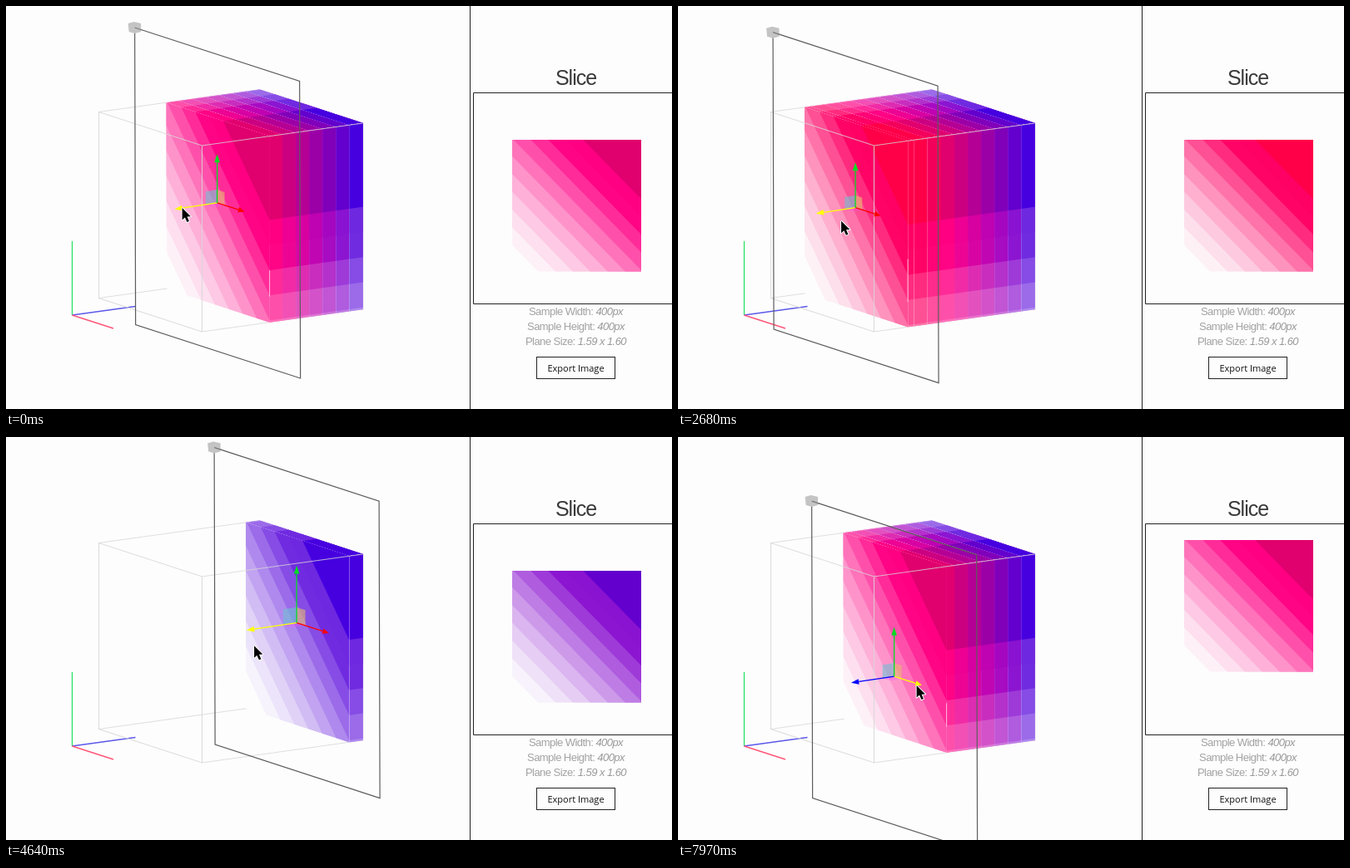
These frames come from a looping animation (800x485 px, 8 s). An HTML page with a canvas:

```html
<!DOCTYPE html>
<html lang="en">
<head>
<meta charset="utf-8">
<title>Slice</title>
<style>
html, body { margin: 0; width: 100%; height: 100%; overflow: hidden; background: #fdfdfd; }
canvas { display: block; position: absolute; left: 0; top: 0; }
.panel { position: absolute; left: 570px; width: 229px; text-align: center;
  font-family: "Liberation Sans", Arial, sans-serif; white-space: nowrap; }
h1 { margin: 0; top: 71px; font-size: 25px; font-weight: 400; line-height: 30px; letter-spacing: -1px; color: #3a3a3a; }
.info { top: 359px; font-size: 13px; line-height: 18px; letter-spacing: -.55px; color: #a2a2a2; }
.info i { color: #999; }
.button { position: absolute; left: 637px; top: 422px; width: 93px; height: 25px; border: 1px solid #222;
  font: 11px/25px "Open Sans", "Noto Sans", sans-serif; color: #111; text-align: center; white-space: nowrap; }
</style>
</head>
<body>
<canvas id="stage" width="800" height="485"></canvas>
<h1 class="panel">Slice</h1>
<div class="panel info">
  <div>Sample Width: <i>400px</i></div>
  <div>Sample Height: <i>400px</i></div>
  <div>Plane Size: <i>1.59 x 1.60</i></div>
</div>
<div class="button">Export Image</div>
<script>
const ctx = document.getElementById('stage').getContext('2d');
const LOOP = 8000, STEP = 85, LEVELS = 12;
const PAPER = '#fdfdfd', INK = '#222';

// Plane depth in the cube, its vertical drop, and the pointer relative to its centre
const REST = { depth: .42, drop: 0, grab: [-43, 6] };
// Each drag lists only what it changes; swing bends the depth on the way
const DRAGS = [
  { from: 630, to: 1420, depth: .202, grab: [-60, 27] },
  { from: 1540, to: 1830, depth: -.01 },
  { from: 1970, to: 2680, depth: .21, swing: -.2, grab: [-18, 16] },
  { from: 2800, to: 3560, depth: .86, swing: .14, grab: [-37, 22] },
  { from: 3680, to: 4430, depth: 1.03, swing: .03, grab: [-53, 27] },
  { from: 4490, to: 5260, depth: .451, grab: [-48, 30] },
  { from: 5410, to: 5580, grab: [0, -45] },
  { from: 5940, to: 6710, drop: -65 },
  { from: 6830, to: 7560, drop: 52, grab: [10, 19] },
  { from: 7670, to: 7970, grab: [26, 11] }
];

// Cube edges on screen
const U = [124, 40.5], W = [193.2, -27], V = [0, 224];
const A = [111.5, 127.5];

const add = (p, v, k = 1) => [p[0] + v[0] * k, p[1] + v[1] * k];
const mix = (a, b, k) => a + (b - a) * k;
const clamp = v => Math.min(1, Math.max(0, v));

function pose(t) {
  let now = { ...REST };
  for (const drag of DRAGS) {
    if (t < drag.from) break;
    const next = { ...now, ...drag };
    const steps = Math.round((drag.to - drag.from) / STEP);
    const done = Math.floor((t - drag.from) / (drag.to - drag.from) * steps + .001);
    const k = clamp((done + 1) / (steps + 1));
    now = {
      depth: mix(now.depth, next.depth, k) + (drag.swing || 0) * Math.sin(Math.PI * k),
      drop: mix(now.drop, next.drop, k),
      grab: now.grab.map((v, i) => mix(v, next.grab[i], k))
    };
  }
  return now;
}

function hovered(t) {
  if (t < 5450) return 'blue';
  if (t < 7480) return t < 5550 ? '' : 'green';
  return t < 7740 ? '' : 'red';
}

// Red runs through magenta to blue with depth; low bands fade to white
function shade(level, s) {
  const k = clamp((level - 3) / 8);
  const red = 255 - 185 * k ** 1.3, blue = 72 + 152 * k;
  if (s > 1.55) return `rgb(${red}, 0, ${blue})`;
  const tone = [Math.min(255, red + 30 + 10 * k), 40 * k ** 6, blue + 28 * (1 - k)];
  const weight = clamp((s - .1) / 1.26) ** 1.5;
  return `rgb(${tone.map(v => mix(253, v, weight))})`;
}

function eachBand(paint) {
  const size = .135;
  for (let s = .2; s < 1.6; s += size) paint(s, s + size / 2);
}

function trace(pts) {
  ctx.beginPath();
  pts.forEach(p => ctx.lineTo(...p));
}

function line(color, width, ...pts) {
  ctx.strokeStyle = color;
  ctx.lineWidth = width;
  trace(pts);
  ctx.stroke();
}

function shape(color, ...pts) {
  ctx.fillStyle = color;
  trace(pts);
  ctx.fill();
}

// Diagonal bands over a unit square placed by the matrix
function section(matrix, level) {
  ctx.save();
  ctx.transform(...matrix);
  ctx.beginPath();
  ctx.rect(0, 0, 1, 1);
  ctx.clip();
  ctx.fillStyle = PAPER;
  ctx.fillRect(0, 0, 1, 1);
  eachBand((s, mid) => shape(shade(level, mid), [s - 2, 2], [s + 2, -2], [4, 4]));
  ctx.restore();
}

// A cube side: one column per level, bands across
function side(matrix, cut) {
  ctx.save();
  ctx.transform(...matrix);
  for (let i = Math.floor(cut * LEVELS); i < LEVELS; i++) {
    const w = Math.max(cut, i / LEVELS);
    eachBand((s, mid) => {
      const top = Math.max(0, s - 1);
      ctx.fillStyle = shade(i, mid);
      ctx.fillRect(w, top, 1 - w, 1 - top);
    });
  }
  ctx.restore();
}

function drawVolume(depth) {
  if (depth >= 1) return;
  const cut = Math.max(0, depth);
  const p = add(A, W, cut), q = add(p, U);
  const up = [-V[0], -V[1]];
  side([...W, ...U, ...A], cut);
  side([...W, ...up, ...add(add(A, U), V)], cut);
  section([...U, ...up, ...add(p, V)], Math.min(LEVELS - 1, Math.floor(cut * LEVELS + .1)));
  const y = 304 + (cut - .2) * 65;
  line('rgba(255, 235, 245, .7)', 1, [q[0], y], [q[0], y + Math.max(0, 95 * (.75 - cut))]);
}

function drawCube(depth) {
  const B = add(A, U), C = add(A, W), D = add(B, W);
  const [a, b, c, d] = [A, B, C, D].map(p => add(p, V));
  const wire = (...pts) => line('rgba(215, 215, 215, .8)', 1.2, ...pts);
  wire(A, C, D, d, c, C);
  wire(a, c);
  wire(b, d);
  drawVolume(depth);
  wire(D, B, A, a, b, B);
}

function drawAxes() {
  const origin = [79.5, 372];
  line('#22e060', 1.2, origin, [79.5, 283]);
  line('#5c58ea', 1.5, origin, [155.5, 361.5]);
  line('#ff5678', 1.5, origin, [129, 388]);
}

function drawPlane([x, y]) {
  line('#5c5c5c', 1.2, [x, y], [x + 198, y + 64.5], [x + 199, y + 422], [x + 1, y + 357.5], [x, y]);
  shape('#c4c4c4', [x - 8, y - 5], [x - 1, y - 7], [x + 7.5, y - 5], [x + 7.5, y + 5], [x, y + 7], [x - 7, y + 5]);
  line('#777', 1.2, [x, y], [x + 9, y + 3]);
}

function arrow(color, c, dir, size) {
  const tip = add(c, dir, size), len = Math.hypot(...dir);
  const normal = [-dir[1] / len, dir[0] / len];
  const base = add(tip, dir, -10 / Math.sqrt(len));
  line(color, 1.3, c, base);
  shape(color, tip, add(base, normal, 3.3), add(base, normal, -3.3));
}

function drawGizmo(c, depth, hover) {
  const size = 50 + 21 * depth, pad = size * .27;
  const red = [.56, .18], green = [0, -1], blue = [-.87, .13];
  const quad = (color, v, w) => shape(color, c, add(c, v, pad), add(add(c, v, pad), w, pad), add(c, w, pad));
  quad('rgba(255, 80, 255, .3)', red, blue);
  quad('rgba(110, 190, 210, .6)', blue, green);
  quad('rgba(230, 185, 110, .6)', red, green);
  const axis = (name, color, dir) => arrow(name === hover ? '#ff0' : color, c, dir, size);
  axis('red', '#f00', red);
  axis('blue', '#00f', blue);
  axis('green', '#00dd22', green);
}

function drawSlice(depth, drop) {
  line(INK, 1, [557.5, 0], [557.5, 485]);
  if (depth >= 0 && depth < 1) {
    ctx.save();
    ctx.beginPath();
    ctx.rect(562, 105, 238, 253);
    ctx.clip();
    section([155, 0, 0, -158.5, 608, 319.5 - drop * .71], Math.floor(depth * LEVELS));
    ctx.restore();
  }
  line(INK, 1, [810, 104.5], [561.5, 104.5], [561.5, 358.5], [810, 358.5]);
}

function drawCursor(x, y) {
  const pts = [[1, 0], [1, 14.5], [4.3, 11.5], [6.8, 17], [9.3, 16], [6.9, 10.6], [11.3, 10.4], [1, 0]];
  ctx.save();
  ctx.translate(x, y);
  ctx.lineJoin = 'round';
  line('#fff', 2, ...pts);
  shape('#000', ...pts);
  ctx.restore();
}

function draw(t) {
  const { depth, drop, grab } = pose(t);
  const corner = add([73.5, 37.3 + drop], W, depth);
  const centre = add(corner, [99, 211]);
  ctx.fillStyle = PAPER;
  ctx.fillRect(0, 0, 800, 485);
  drawAxes();
  drawCube(depth);
  drawPlane(corner);
  drawGizmo(centre, depth, hovered(t));
  drawSlice(depth, drop);
  drawCursor(...add(centre, grab));
}

const start = performance.now();
function tick() {
  draw((performance.now() - start) % LOOP);
  requestAnimationFrame(tick);
}
tick();
</script>
</body>
</html>
```
